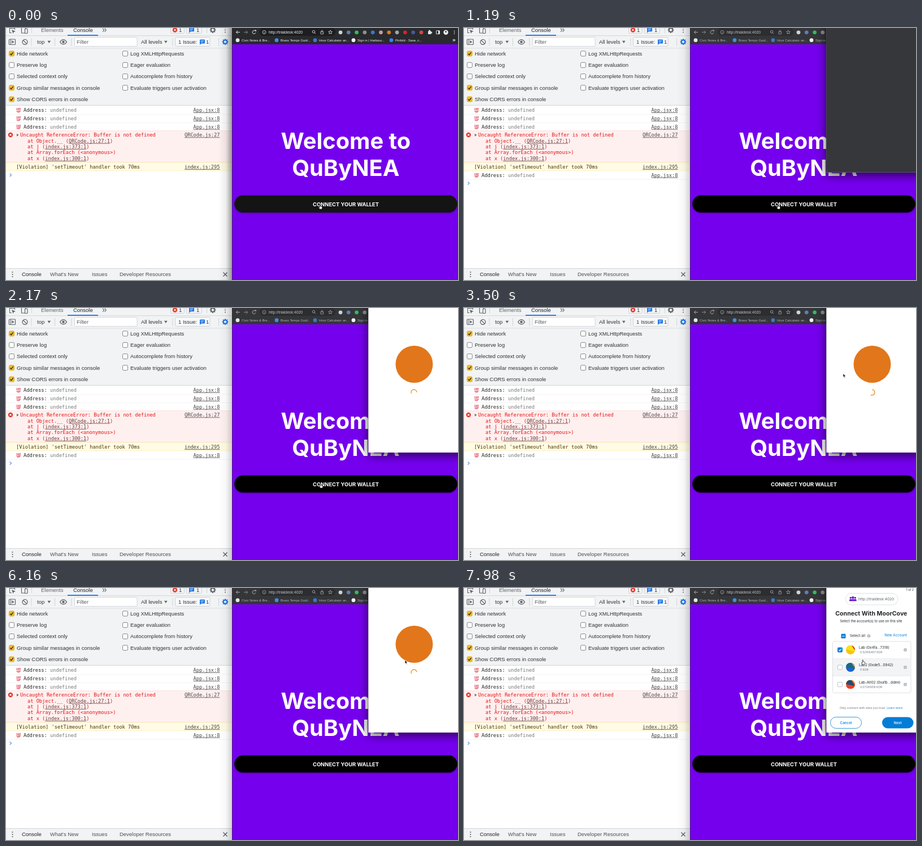
An HTML page with a canvas for the animation above (8 s loop, 800 px wide and 448 px high).

```html
<!DOCTYPE html>
<html lang="en">
<head>
<meta charset="utf-8">
<title>Connect wallet</title>
<style>
  html, body { margin: 0; width: 100%; height: 100%; overflow: hidden; background: #fff; }
  canvas { display: block; width: 800px; height: 448px; }
</style>
</head>
<body>
<canvas id="stage" width="800" height="448"></canvas>
<script>
const ctx = document.getElementById('stage').getContext('2d');
const LOOP = 8000, STEP = 70;
const LOGGED = 490, CLICK = 560, POPUP = 1120, LOADING = 2030, LIST = 7140;
const UI = '"Liberation Sans", Arial, sans-serif';
const MONO = '"DejaVu Sans Mono", monospace';
const INTER = 'Inter, sans-serif';
const GREY = '#5f6368', BLUE = '#1a73e8', ORANGE = '#e2761b';

function rect(x, y, w, h, color) {
  ctx.fillStyle = color;
  ctx.fillRect(x, y, w, h);
}

function box(x, y, w, h, r, fill, stroke, width = 1) {
  ctx.beginPath();
  ctx.roundRect(x, y, w, h, r);
  if (fill) { ctx.fillStyle = fill; ctx.fill(); }
  if (stroke) { ctx.strokeStyle = stroke; ctx.lineWidth = width; ctx.stroke(); }
}

function dot(x, y, r, color) {
  ctx.beginPath();
  ctx.arc(x, y, r, 0, Math.PI * 2);
  ctx.fillStyle = color;
  ctx.fill();
}

function ring(x, y, r, color, width = 1, from = 0, to = Math.PI * 2) {
  ctx.beginPath();
  ctx.arc(x, y, r, from, to);
  ctx.strokeStyle = color;
  ctx.lineWidth = width;
  ctx.stroke();
}

function line(color, width, ...p) {
  ctx.beginPath();
  for (let i = 0; i < p.length; i += 2) ctx.lineTo(p[i], p[i + 1]);
  ctx.strokeStyle = color;
  ctx.lineWidth = width;
  ctx.stroke();
}

function shape(fill, ...p) {
  ctx.beginPath();
  for (let i = 0; i < p.length; i += 2) ctx.lineTo(p[i], p[i + 1]);
  ctx.closePath();
  ctx.fillStyle = fill;
  ctx.fill();
}

// Returns the drawn width so that runs can be chained.
function text(str, x, y, font, color, align = 'left') {
  ctx.font = font;
  ctx.fillStyle = color;
  ctx.textAlign = align;
  ctx.fillText(str, x, y);
  return ctx.measureText(str).width;
}

const ui = (str, x, y, color = '#303236') => text(str, x, y, `9.47px ${UI}`, color);
const mono = (str, x, y, color) => text(str, x, y, `8.66px ${MONO}`, color);

function link(str, x, y, color = '#454545') {
  const w = mono(str, x, y, color);
  rect(x, y + 1.2, w, 0.8, color);
  return w;
}

function rightLink(str, y) {
  ctx.font = `8.66px ${MONO}`;
  link(str, 378.5 - ctx.measureText(str).width, y);
}

function gear(x, y, color) {
  for (let i = 0; i < 8; i++) {
    const a = i * Math.PI / 4, c = Math.cos(a), s = Math.sin(a);
    line(color, 2, x + c * 3.5, y + s * 3.5, x + c * 5.4, y + s * 5.4);
  }
  ring(x, y, 3.2, color, 2);
}

function bubble(x, y) {
  box(x - 4.5, y - 4, 9, 7, 1, BLUE);
  shape(BLUE, x - 4.5, y + 2, x - 4.5, y + 5.5, x - 1, y + 2);
  line('#fff', 0.8, x - 2.8, y - 1.6, x + 2.8, y - 1.6);
  line('#fff', 0.8, x - 2.8, y + 0.6, x + 1.4, y + 0.6);
}

function menuDots(x, y, color, gap = 4, r = 1) {
  for (let i = -1; i <= 1; i++) dot(x, y + i * gap, r, color);
}

function chevrons(x, y, r, color) {
  for (const dx of [0, r * 1.2]) line(color, 1.1, x + dx, y - r, x + dx + r * 0.9, y, x + dx, y + r);
}

const caret = (x, y) => shape(GREY, x, y, x + 5.6, y, x + 2.8, y + 4.4);

function option(label, x, y, on) {
  box(x + 0.5, y - 4.5, 9, 9, 2, on ? '#f9bd1b' : '#fff', on ? '#e0a70f' : '#767676', 0.9);
  if (on) line('#33302a', 1.5, x + 2.4, y + 0.2, x + 4.3, y + 2.3, x + 7.7, y - 2.4);
  ui(label, x + 14, y + 3.3);
}

function errorIcon(x, y) {
  dot(x, y, 4.2, '#e3352c');
  line('#fff', 1.1, x - 1.6, y - 1.6, x + 1.6, y + 1.6);
  line('#fff', 1.1, x + 1.6, y - 1.6, x - 1.6, y + 1.6);
}

function addressRow(y) {
  text('100', 22, y - 2.6, `italic bold 4.8px ${UI}`, '#d92436', 'center');
  line('#d92436', 1, 18.5, y - 0.6, 26, y - 1.6);
  line('#d92436', 0.8, 20, y + 1, 25, y + 0.3);
  mono('Address:', 31, y, '#222');
  mono('undefined', 78, y, '#77797c');
  rightLink('App.jsx:8', y);
}

function devtoolsBars() {
  rect(0, 0, 400, 137, '#f1f3f4');
  rect(0, 13.4, 400, 0.8, '#cacdd1');
  rect(0, 35.5, 400, 0.8, '#d3d6d9');

  // Tab strip
  line(GREY, 1.1, 10, 8.5, 6.5, 8.5, 6.5, 0);
  line(GREY, 1.1, 6.5, 0.5, 15.5, 0.5, 15.5, 3);
  shape(GREY, 10, 3, 17, 6, 13.8, 7, 12.6, 10);
  box(27.5, -3, 7, 12, 1, null, GREY, 1.2);
  box(33.5, 1.5, 4.5, 8, 1, '#f1f3f4', GREY, 1.2);
  rect(45, 0, 0.8, 9, '#cacdd1');
  ui('Elements', 62, 6.8, GREY);
  ui('Console', 119, 6.8, '#202124');
  rect(109, 12, 54, 1.8, BLUE);
  chevrons(171, 3.8, 3, GREY);
  box(291.5, -6, 24, 15.5, 2, null, '#cacdd1', 0.8);
  errorIcon(299, 3.5);
  ui('1', 306, 7);
  box(319.5, -6, 27, 15.5, 2, null, '#cacdd1', 0.8);
  bubble(328.5, 3.2);
  ui('1', 337, 7);
  rect(355, 0, 0.8, 9, '#cacdd1');
  gear(366, 3.5, GREY);
  menuDots(388, 3.5, GREY);

  // Console toolbar
  box(5.5, 20, 11, 9.5, 1, null, GREY, 1.2);
  rect(8, 20, 1, 9.5, GREY);
  shape(GREY, 10.5, 22, 14.5, 24.8, 10.5, 27.5);
  ring(33.5, 24.8, 4.5, GREY, 1.3);
  line(GREY, 1.3, 30.4, 21.7, 36.6, 27.9);
  for (const x of [44.5, 86, 115.5, 294.5, 376]) rect(x, 18, 0.8, 14, '#cacdd1');
  ui('top', 55, 28);
  caret(73.5, 22.7);
  ctx.beginPath();
  ctx.moveTo(95.5, 24.8);
  ctx.quadraticCurveTo(101.5, 16.6, 107.5, 24.8);
  ctx.quadraticCurveTo(101.5, 33, 95.5, 24.8);
  ctx.strokeStyle = GREY;
  ctx.lineWidth = 1.3;
  ctx.stroke();
  dot(101.5, 24.8, 2.2, GREY);
  box(121.5, 16.5, 110.5, 16, 1, '#fff', '#cfd2d6', 0.9);
  ui('Filter', 125, 28, '#5a5d61');
  ui('All levels', 239, 28);
  caret(280, 22.7);
  box(299.5, 16.5, 61.5, 16, 2, '#f6f8f9', '#cacdd1', 0.9);
  ui('1 Issue:', 305, 28);
  bubble(347.5, 24.4);
  ui('1', 354, 28);
  gear(388, 24.6, BLUE);

  option('Hide network', 5, 45.5, true);
  option('Preserve log', 5, 65.8, false);
  option('Selected context only', 5, 86, false);
  option('Group similar messages in console', 5, 106.3, true);
  option('Show CORS errors in console', 5, 126.6, true);
  option('Log XMLHttpRequests', 206, 45.5, false);
  option('Eager evaluation', 206, 65.8, false);
  option('Autocomplete from history', 206, 86, false);
  option('Evaluate triggers user activation', 206, 106.3, false);
}

function consoleLog(t) {
  rect(0, 137, 400, 0.8, '#cacdd1');
  for (const y of [149, 164, 178.6]) addressRow(y);
  for (const y of [153, 168]) rect(0, y, 399, 0.8, '#f0f0f0');

  rect(0, 182.5, 399, 56.5, '#fff0f0');
  rect(0, 182.5, 399, 0.8, '#ffd7d7');
  rect(0, 238.5, 399, 15.3, '#fffbe5');
  rect(0, 238.5, 399, 0.8, '#f7dfb0');
  rect(0, 253.5, 399, 0.8, '#fff1b8');

  const red = '#e51212';
  errorIcon(8, 190);
  shape('#6e6e6e', 19, 187.8, 22.6, 190.3, 19, 192.8);
  mono('Uncaught ReferenceError: Buffer is not defined', 25, 193.2, red);
  rightLink('QRCode.js:27', 193.2);
  const stack = [['Object.__ (', 'QRCode.js:27:1'], ['j (', 'index.js:373:1'],
    ['Array.forEach (<anonymous>', ''], ['x (', 'index.js:300:1']];
  stack.forEach(([call, place], i) => {
    const y = 203.6 + i * 10.4;
    let x = 38 + mono('at ' + call, 38, y, red);
    if (place) x += link(place, x, y, '#6b3a3a');
    mono(')', x, y, red);
  });
  mono("[Violation] 'setTimeout' handler took 70ms", 18, 250, '#4c3500');
  rightLink('index.js:295', 250);

  let prompt = 261.3;
  if (t >= LOGGED) {
    addressRow(264.5);
    rect(0, 268.7, 399, 0.8, '#f0f0f0');
    prompt = 276;
  }
  line('#5a8fe6', 1.2, 6.8, prompt - 2.7, 9.4, prompt, 6.8, prompt + 2.7);
}

function drawer() {
  rect(0, 427, 400, 21, '#f1f3f4');
  rect(0, 427, 400, 0.8, '#cacdd1');
  menuDots(11.5, 438, GREY, 4, 1.1);
  ui('Console', 28, 441.3, '#202124');
  ui("What's New", 78, 441.3, '#4c4f54');
  ui('Issues', 152, 441.3, '#4c4f54');
  ui('Developer Resources', 201, 441.3, '#4c4f54');
  line(GREY, 1.4, 384.5, 434.5, 391.5, 441.5);
  line(GREY, 1.4, 391.5, 434.5, 384.5, 441.5);
}

// The browser window casts a shadow on the panel to its left.
function windowShadow(active) {
  const g = ctx.createLinearGradient(376, 0, 400, 0);
  const k = active ? 1 : 0.45;
  g.addColorStop(0, 'rgba(0,0,0,0)');
  g.addColorStop(0.55, `rgba(0,0,0,${0.07 * k})`);
  g.addColorStop(1, `rgba(0,0,0,${0.38 * k})`);
  rect(376, 0, 24, 448, g);
}

function browserBar(active) {
  const fg = active ? '#e4e5e7' : '#a9abae';
  rect(400, 0, 400, 29, active ? '#292a2d' : '#35363a');
  ctx.save();
  ctx.translate(0, 0.5);
  box(449, -1, 134, 14.5, 7, active ? '#1c1d20' : '#2c2d30');
  line(fg, 1, 414, 7, 407.5, 7);
  line(fg, 1, 410.3, 4, 407.3, 7, 410.3, 10);
  line('#85878a', 1, 421, 7, 427.5, 7);
  line('#85878a', 1, 424.7, 4, 427.7, 7, 424.7, 10);
  ring(439, 7, 2.9, fg, 1, 0.3, 5.3);
  shape(fg, 439.5, 3, 442.7, 3, 442.7, 6.2);
  ring(457, 7, 3.1, fg, 0.8);
  line(fg, 0.8, 457, 6.4, 457, 8.8);
  text('http://trialdesk:4020', 465, 9.5, `6.9px ${UI}`, active ? '#f1f1f1' : '#c2c4c6');
  ring(544.5, 6.2, 2.2, fg, 0.9);
  line(fg, 0.9, 546, 7.8, 548, 9.8);
  box(556.8, 5.5, 5, 4.8, 0.5, null, fg, 0.8);
  line(fg, 0.8, 559.3, 8, 559.3, 2.8);
  const star = [];
  for (let i = 0; i < 10; i++) {
    const a = i * Math.PI / 5 - Math.PI / 2, r = i % 2 ? 1.6 : 3.6;
    star.push(574 + Math.cos(a) * r, 7 + Math.sin(a) * r);
  }
  line(fg, 0.8, ...star, star[0], star[1]);

  const badges = ['#cfd2d6', '#5b7db4', '#2ebd59', '#8c8e92', '#3478d4', '#c99aa8',
    ORANGE, '#a3a4a8', '#d8232a', '#445a9c', '#d5483f'];
  badges.forEach((c, i) => dot(592 + i * 14.3, 7.3, 3.4, c));
  box(747, 5, 5.5, 5.5, 0.6, fg);
  dot(749.6, 4.4, 1.4, fg);
  dot(753, 7.6, 1.4, fg);
  box(761.5, 4.2, 6, 6, 0.6, null, fg, 1);
  rect(765, 4.2, 2.5, 6, fg);
  dot(778.5, 7.3, 4.2, '#eceff1');
  dot(778.5, 6.2, 1.4, '#333');
  menuDots(793.5, 7.3, fg, 2.5, 0.8);

  const marks = [[410, '#e5e7ea', 'Civic Notes & Bre...'], [479, '#3c8fe0', 'Brass Tempo Guid...'],
    [547, '#3b78c4', 'Hour Calculator an...'], [615, '#f3f3f3', 'Sign in | Harbour...'],
    [682, '#3c7ff0', 'Pinfold - Save, c...']];
  for (const [x, color, label] of marks) {
    dot(x, 21.2, 3.4, color);
    text(label, x + 7, 23.3, `5.8px ${UI}`, active ? '#f4f4f5' : '#b4b6b9');
  }
  chevrons(791, 21.2, 1.8, fg);
  ctx.restore();
}

function page(t) {
  rect(400, 29, 400, 419, '#7500ee');
  text('Welcome to', 601.3, 215.3, `bold 39.8px ${INTER}`, '#fff', 'center');
  text('QuByNEA', 601.3, 263.3, `bold 39.8px ${INTER}`, '#fff', 'center');
  ctx.save();
  ctx.shadowColor = 'rgba(0,0,0,.4)';
  ctx.shadowBlur = 3;
  ctx.shadowOffsetY = 1;
  box(404.3, 297.6, 394.4, 30.4, 15.2, t < LOGGED ? '#141414' : t < POPUP ? '#232323' : '#000');
  ctx.restore();
  text('CONNECT YOUR WALLET', 601.5, 316.7, `bold 9.4px ${INTER}`, '#fff', 'center');
  rect(400, 0, 1, 448, 'rgba(30,20,50,.55)');
}

function loading(t) {
  dot(722.5, 100, 33, ORANGE);
  const mid = t / 1000 * Math.PI * 2 - 2.88;
  ring(722, 150, 5, '#eb9a36', 1.5, mid - 1.75, mid + 1.75);
}

function info(x, y) {
  dot(x, y, 2.9, '#b6b9bd');
  rect(x - 0.4, y - 0.5, 0.8, 2, '#fff');
  rect(x - 0.4, y - 1.7, 0.8, 0.8, '#fff');
}

function account(y, name, sum, colors, on) {
  box(661.5, y - 4, 8, 8, 1.2, on ? '#037dd6' : '#fff', on ? '#037dd6' : '#b5b9be', 0.9);
  if (on) line('#fff', 1.2, 663.3, y, 665, y + 1.9, 668, y - 1.9);
  ctx.save();
  ctx.beginPath();
  ctx.arc(684, y, 8, 0, Math.PI * 2);
  ctx.clip();
  rect(676, y - 8, 16, 16, colors[0]);
  shape(colors[1], 676, y - 8, 685, y - 8, 692, y + 3, 684, y + 1, 676, y - 1);
  shape(colors[2], 686, y - 8, 692, y - 8, 692, y + 1);
  ctx.restore();
  text(name, 699, y - 2, `6.3px ${INTER}`, '#24272a');
  text(sum, 701, y + 6, `5px ${INTER}`, '#6a737d');
  info(781, y);
}

function accountList() {
  text('1 of 2', 796, 5.3, `5.3px ${INTER}`, '#24272a', 'right');
  box(675.5, 9.5, 92.5, 20.5, 10.2, '#fff', '#d6d9dc', 0.8);
  for (const [x, y, r] of [[684.3, 17.5, 1.7], [692.3, 17.5, 1.7], [688.3, 17, 2.2]]) {
    dot(x, y, r, '#6b21c8');
    box(x - r * 1.4, y + r + 0.6, r * 2.8, 3.4, [2, 2, 0, 0], '#6b21c8');
  }
  text('http://trialdesk:4020', 698, 22.2, `6.5px ${INTER}`, '#5a6066');
  text('Connect With MoorCove', 720.8, 49.3, `bold 10.6px ${INTER}`, '#24272a', 'center');
  text('Select the account(s) to use on this site', 720.5, 61, `5.9px ${INTER}`, '#24272a', 'center');

  box(667.5, 81.5, 8, 8, 1.2, '#037dd6');
  rect(669.3, 85, 4.4, 1.1, '#fff');
  text('Select all', 683, 87.3, `6.3px ${INTER}`, '#24272a');
  info(716.5, 85.2);
  text('New Account', 784, 86.3, `6.25px ${INTER}`, '#037dd6', 'right');

  box(652.5, 95, 138.5, 91.5, 3, '#fff', '#d6d9dc', 0.8);
  rect(653, 126, 137.5, 30, '#f3f4f5');
  ctx.setLineDash([1.5, 1]);
  line('#d6d9dc', 0.8, 653, 125.7, 790.5, 125.7);
  line('#d6d9dc', 0.8, 653, 156.2, 790.5, 156.2);
  ctx.setLineDash([]);
  account(110, 'Lab (0x4fa...7318)', '0.52816407 KOR', ['#f3c80e', '#f8e21a', '#d03a24'], true);
  account(141, 'Lab2 (0xde5...0942)', '0 KOR', ['#1d62d2', '#176b7c', '#f0a818'], false);
  account(171.5, 'Lab-Alt02 (0xa1b...ddee)', '0.07345618 KOR', ['#ef3e24', '#174f77', '#f28a1c'], false);

  const w = text('Only connect with sites you trust. ', 665, 214.5, `5.2px ${INTER}`, '#6a737d');
  text('Learn more', 665 + w, 214.5, `5.2px ${INTER}`, '#037dd6');
  box(648.5, 229.5, 55, 20, 10, '#fff', '#037dd6', 0.8);
  text('Cancel', 676, 242, `500 6.3px ${INTER}`, '#037dd6', 'center');
  box(740, 229.5, 55.5, 20, 10, '#037dd6');
  text('Next', 767.7, 242, `500 6.3px ${INTER}`, '#fff', 'center');
}

function popup(t) {
  ctx.save();
  ctx.shadowColor = 'rgba(0,0,0,.65)';
  ctx.shadowBlur = 16;
  ctx.shadowOffsetY = 5;
  rect(641, -10, 170, 267, t < LOADING ? '#35373b' : '#fff');
  ctx.restore();
  rect(641, 0, 0.7, 257, 'rgba(90,90,95,.6)');
  if (t < LOADING) rect(641, 256.2, 159, 0.8, '#606267');
  else if (t < LIST) loading(t);
  else accountList();
}

// Time, x, y
const path = [[0, 556, 314], [2100, 556, 314], [3300, 671, 116.5], [3570, 671, 116.5],
  [4340, 704, 124.5], [5110, 704, 124.5], [6090, 706, 128], [LOOP, 706, 128]];

function cursorAt(t) {
  const i = path.findIndex((p, n) => n && t <= p[0]);
  const [t0, x0, y0] = path[i - 1], [t1, x1, y1] = path[i];
  const u = (t - t0) / (t1 - t0), k = u * u * (3 - 2 * u);
  return [x0 + (x1 - x0) * k, y0 + (y1 - y0) * k];
}

function cursor(t) {
  const [x, y] = cursorAt(t);
  const age = (t - CLICK) / 490;
  if (age >= 0 && age < 1) {
    ring(555, 315.8, 7.5 + age * 5, `rgba(205,150,50,${0.95 - age * 0.6})`, 1.6);
  }
  ctx.save();
  ctx.translate(x, y);
  ctx.lineJoin = 'round';
  const hand = t <= 2170 || t >= LIST;
  const p = hand
    ? [-0.8, 0, 0.3, 0, 0.5, 3, 3.6, 3.8, 3.6, 6, 2.8, 8, -0.6, 8, -2.6, 5, -2, 4.3, -0.8, 5]
    : [0, 0, 0, 6.6, 1.5, 5.3, 2.7, 8, 3.8, 7.4, 2.7, 4.9, 4.7, 4.8];
  const edge = hand ? '#222' : '#fff';
  shape(hand ? '#fff' : '#111', ...p);
  line(edge, 0.7, ...p, p[0], p[1]);
  ctx.restore();
}

function draw(t) {
  const active = t < POPUP;
  rect(0, 0, 800, 448, '#fff');
  devtoolsBars();
  consoleLog(t);
  drawer();
  windowShadow(active);
  browserBar(active);
  page(t);
  if (!active) popup(t);
  cursor(t);
}

const start = performance.now();
function tick() {
  const t = (performance.now() - start) % LOOP;
  draw(Math.floor(t / STEP) * STEP);
  requestAnimationFrame(tick);
}
tick();
</script>
</body>
</html>
```
